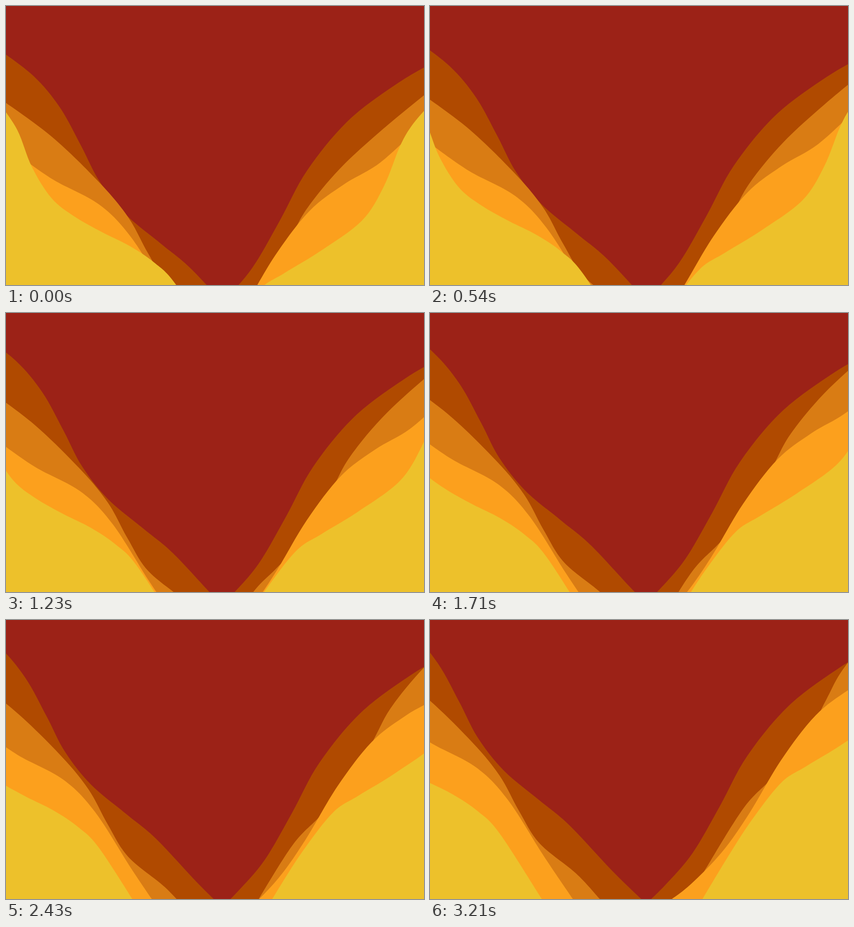
These frames come from a looping animation (916 px wide and 611 px high, 3.38 s). An HTML page:

```html
<!DOCTYPE html>
<html lang="en">
<head>
<meta charset="utf-8">
<title>Layered waves</title>
<style>
  html, body { margin: 0; width: 100%; height: 100%; overflow: hidden; background: #9c2217; }
  svg { display: block; width: 100%; height: 100%; }
</style>
</head>
<body>
<svg id="stage" viewBox="0 0 916 611" preserveAspectRatio="none"></svg>
<script>
const LOOP = 3380, STEP = 30, TRAVEL = 3210;
const stage = document.getElementById('stage');
const waves = [];

// Smooth Catmull-Rom curve through the points, closed far below the stage.
function wavePath(text) {
  const points = text.split(' ').map(pair => pair.split(',').map(Number));
  const at = i => points[Math.max(0, Math.min(points.length - 1, i))];
  const handle = (i, sign) =>
    at(i).map((v, k) => (v + sign * (at(i + 1)[k] - at(i - 1)[k]) / 6).toFixed(2));
  let d = 'M' + points[0];
  for (let i = 0; i < points.length - 1; i++) {
    d += `C${handle(i, 1)} ${handle(i + 1, -1)} ${points[i + 1]}`;
  }
  return `${d}V1300H${points[0][0]}Z`;
}

// dx, dy: distance the wave drifts over one loop.
function addWave(fill, dx, dy, points) {
  const path = document.createElementNS('http://www.w3.org/2000/svg', 'path');
  path.setAttribute('d', wavePath(points));
  path.setAttribute('fill', fill);
  stage.append(path);
  waves.push({ path, dx, dy });
}

const BROWN = '#b04a00', COPPER = '#d97c14', ORANGE = '#fca01d', YELLOW = '#edc12b';

addWave(BROWN, -100, -126, '-20,92 60,153 118,222 165,307 205,384 262,456 340,521 405,575 500,676 565,739');
addWave(BROWN, 35, -62, '945,119 860,168 750,251 660,360 600,470 540,573 480,643 440,682');
addWave(COPPER, -116, -123, '-20,198 100,286 205,387 268,463 311,541 356,612 436,678 488,734');
addWave(COPPER, 245, -335, '935,180 822,273 731,357 660,443 622,512 565,620 498,688 440,750 356,885');
addWave(ORANGE, -103, -112, '20,322 103,380 203,434 273,505 353,630 416,723');
addWave(ORANGE, 180, -240, '905,265 820,343 740,391 665,449 590,546 520,663 460,748 390,820 340,858');
addWave(YELLOW, -220, -143, '-15,212 25,272 57,353 100,421 150,461 210,495 270,525 325,562 373,611 465,754');
addWave(YELLOW, 215, -265, '930,214 890,261 863,308 828,395 780,470 690,536 610,585 555,621 493,699 440,780 375,888');

function render(ms) {
  const time = Math.min(TRAVEL, Math.floor((ms % LOOP) / STEP) * STEP);
  const progress = time / TRAVEL;
  for (const { path, dx, dy } of waves) {
    path.setAttribute('transform', `translate(${dx * progress} ${dy * progress})`);
  }
}

const start = performance.now();
function tick() {
  render(performance.now() - start);
  requestAnimationFrame(tick);
}
tick();
</script>
</body>
</html>
```
